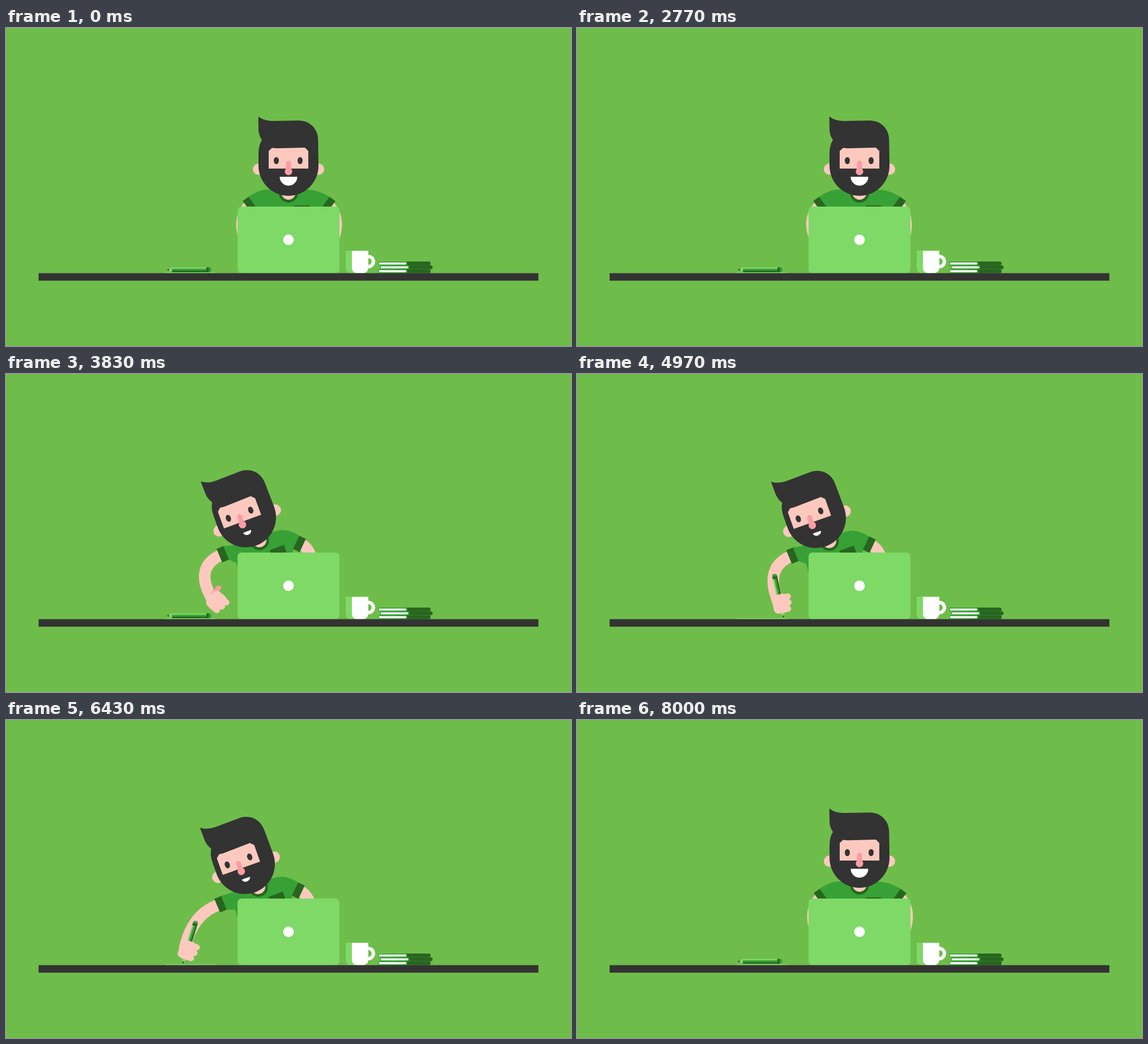
Recreate the animation shown at these times as an HTML page with a canvas. Size 998x561 px, loop 8330 ms.

```html
<!DOCTYPE html>
<html lang="en">
<head>
<meta charset="utf-8">
<title>Desk work</title>
<style>
html, body { margin: 0; width: 100%; height: 100%; overflow: hidden; background: #6ebd4a; }
canvas { display: block; }
</style>
</head>
<body>
<canvas id="stage" width="998" height="561"></canvas>
<script>
const ctx = document.getElementById('stage').getContext('2d');
const LOOP = 8330, MOVE_END = 8000;
const C = {
  bg: '#6ebd4a', dark: '#333333', skin: '#fdc9be', pink: '#fb9ca4',
  shirt: '#37a136', deep: '#27661f', light: '#7ed966', white: '#ffffff'
};
const RAD = Math.PI / 180;

const lerp = (a, b, k) => a + (b - a) * k;
const mix = (a, b, k) => a.map((v, i) => lerp(v, b[i], k));
const clamp = v => Math.max(0, Math.min(1, v));
function ease(t, from, to) {
  const u = clamp((t - from) / (to - from));
  return u < 0.5 ? 4 * u ** 3 : 1 - 4 * (1 - u) ** 3;
}
// Stage point of (dx, dy) in the frame of a joint [x, y, angle].
function at([x, y, deg], dx, dy) {
  const c = Math.cos(deg * RAD), s = Math.sin(deg * RAD);
  return [x + dx * c - dy * s, y + dx * s + dy * c];
}

function fill(color, draw) {
  ctx.fillStyle = color;
  ctx.beginPath();
  draw();
  ctx.fill();
}
const rect = (color, x, y, w, h, r = 0) => fill(color, () => ctx.roundRect(x, y, w, h, r));
const oval = (color, x, y, rx, ry = rx) => fill(color, () => ctx.ellipse(x, y, rx, ry, 0, 0, 7));
const poly = (color, ...p) => fill(color, () => {
  for (let i = 0; i < p.length; i += 2) ctx.lineTo(p[i], p[i + 1]);
});
function group([x, y, deg], draw) {
  ctx.save();
  ctx.translate(x, y);
  ctx.rotate(deg * RAD);
  draw();
  ctx.restore();
}
function limb(shoulder, elbow, wrist) {
  ctx.strokeStyle = C.skin;
  ctx.lineWidth = 20.5;
  ctx.beginPath();
  ctx.moveTo(shoulder[0], shoulder[1]);
  ctx.quadraticCurveTo(...elbow, ...wrist);
  ctx.stroke();
}

// Each joint goes from the typing pose to the leaning pose.
const NECK = [[499, 292, 0], [446, 296, -20]];
const HEAD = [[499, 249, 0], [424, 259.7, -19.6]];
const CUFF_L = [[431, 312, -36], [380.5, 320.5, -22.6]];
const CUFF_R = [[569, 312, 36], [516.3, 301, 25]];
const ELBOW_L = [[404.5, 341], [329, 340]];
const ELBOW_R = [[595.5, 341], [535.5, 304.5]];
const WRIST_R = [[572, 385], [545, 350]];
const KEYS = [434, 388, 40], REACH = [372, 403, 40];
const FLAT = [284, 426.5, 90];
const CUFF_W = 13, CUFF_H = 26;

const PICK = 4167, WRITE = 4900, STOP = 6600, DROP = 7000;

// Pencil tip and tilt while it scribbles across the paper.
function writing(t) {
  const k = t - 4970;
  const x = 365 - 0.0363 * k + 4 * Math.sin(2 * Math.PI * k / 365);
  return [x, 430, -12.2 + (365 - x) * 0.56];
}

function pencilPose(t) {
  if (t < PICK) return FLAT;
  if (t < WRITE) {
    const u = ease(t, PICK, WRITE), p = mix(FLAT, writing(WRITE), u);
    p[1] -= 14 * Math.sin(Math.PI * u);
    return p;
  }
  if (t < STOP) return writing(t);
  return mix(writing(STOP), [283.6, 425.8, 90], ease(t, STOP, DROP));
}

// Hand joint while it holds the pencil.
function grip(pencil) {
  const flat = clamp((pencil[2] - 18) / 72), [x, y] = at(pencil, 2, -24);
  return [x, y - 16 * flat, pencil[2] - 51 * flat];
}

function handPose(t, w) {
  if (t < 3830) return mix(KEYS, REACH, w);
  if (t < PICK) return mix(REACH, grip(FLAT), ease(t, 3830, PICK));
  if (t < DROP) return grip(pencilPose(t));
  return mix(KEYS, grip(pencilPose(DROP)), w);
}

function drawPencil(pose) {
  group(pose, () => {
    rect(C.shirt, -4.3, -79, 8.6, 9, [4, 4, 0, 0]);
    rect(C.deep, -4.3, -74.5, 8.6, 4.5);
    rect(C.light, -4.3, -70, 2.6, 61);
    rect(C.shirt, -1.8, -70, 3.4, 61);
    rect(C.deep, 1.5, -70, 2.8, 61);
    poly(C.light, -4.3, -9.2, 4.3, -9.2, 0, 0);
    poly(C.dark, -1.8, -3.8, 1.8, -3.8, 0, 0);
  });
}

function drawHand(pose, open) {
  group(pose, () => {
    if (open > 0) rect(C.pink, -18.2, -8 - 18.5 * open, 9, 22, 4.5);
    rect(C.skin, -16, -18, 28, 33, 8);
    for (let i = 0; i < 3; i++) rect(C.skin, -8, -16.5 + i * 10.5, 26.5 - i * i, 11, 5.5);
  });
}

function drawHead(pose, w, blink) {
  group(pose, () => {
    ctx.translate(-499, -249);
    oval(C.skin, 446, 249, 10);
    oval(C.skin, 552, 249, 10);
    fill(C.dark, () => {
      ctx.moveTo(445.7, 156);
      ctx.quadraticCurveTo(456, 164.3, 472, 164);
      ctx.lineTo(517, 163.3);
      ctx.bezierCurveTo(537, 163.3, 551.3, 178, 551.3, 198);
      ctx.lineTo(552, 243);
      ctx.arc(499, 243, 53, 0, Math.PI);
      ctx.lineTo(446, 222);
      ctx.quadraticCurveTo(446, 207, 452, 197.5);
      ctx.quadraticCurveTo(446, 189, 446, 178);
    });
    // The face slides sideways as the head turns.
    ctx.translate(-8.3 * w, 0);
    poly(C.skin, 464, 217, 470, 211.5, 478, 212.3, 528, 211, 534, 217, 534, 248, 464, 248);
    for (const x of [477.5, 519.5]) oval(C.dark, x, 234, 4.5, 6.2 * blink);
    fill(C.white, () => ctx.ellipse(499 + 1.5 * w, lerp(262.5, 267, w),
      lerp(15.5, 7.5, w), lerp(15.7, 6.3, w), 0, 0, Math.PI));
    ctx.translate(-2 * w, 0);
    rect(C.pink, 494.7, 234, 8.6, 22, 4.3);
    oval(C.pink, 499, 253, 6.6);
  });
}

function drawCuff(joint) {
  group(joint, () => rect(C.deep, -CUFF_W / 2, -CUFF_H / 2, CUFF_W, CUFF_H));
}

function drawShirt(neck, cuffL, cuffR) {
  const inner = (cuff, side, end) => at(cuff, side * CUFF_W / 2, end * CUFF_H / 2);
  fill(C.shirt, () => {
    ctx.moveTo(...inner(cuffL, 1, -1));
    ctx.quadraticCurveTo(...at(neck, -50, -9), ...at(neck, -31, -7));
    ctx.lineTo(...at(neck, 31, -7));
    ctx.quadraticCurveTo(...at(neck, 52, -7), ...inner(cuffR, -1, -1));
    ctx.lineTo(...inner(cuffR, -1, 1));
    ctx.lineTo(...at(neck, 40, 60));
    ctx.lineTo(...at(neck, -53, 37));
    ctx.lineTo(...at(neck, -52, 22));
    ctx.lineTo(...inner(cuffL, 1, 1));
  });
  group(neck, () => {
    rect(C.deep, 11, 21, 27, 20);
    oval(C.deep, 0, -1, 17);
    oval(C.skin, 0, -1.5, 12.5);
  });
}

function drawMug() {
  rect(C.light, 600, 393, 30, 39.5, [0, 0, 9, 9]);
  rect(C.white, 611, 393, 29, 39.5, [0, 0, 9, 9]);
  ctx.strokeStyle = C.white;
  ctx.lineWidth = 6;
  ctx.beginPath();
  ctx.arc(640, 412, 9, -Math.PI / 2, Math.PI / 2);
  ctx.stroke();
}

function drawBooks() {
  for (let i = 0; i < 3; i++) {
    const dx = i % 2 * 3.5, y = 412 + i * 6.8;
    rect(C.deep, 690 + dx, y, 60, 6.8, [0, 3, 3, 0]);
    rect(C.shirt, 658 + dx, y, 51, 6.8, [0, 3.4, 3.4, 0]);
    rect(C.white, 659 + dx, y + 1.7, 48, 3.5, [0, 1.7, 1.7, 0]);
  }
}

function draw(t) {
  const start = ease(t, 3133, 3830);
  const body = start - ease(t, 7067, 7833);
  const head = start - ease(t, 7067, 7700);
  const arm = start - ease(t, 7167, 8000);
  const settle = start * (1 - ease(t, 3830, 4230));
  const tap = -1.25 * (1 - Math.cos(6 * Math.PI * t / 1000)) * (1 - arm);
  const blink = Math.min(...[467, 2133, 4600].map(b => Math.max(0.1, clamp(Math.abs(t - b) / 120))));

  // Pose between two ends, moved by (dx, dy), with the settling after the lean.
  const pose = ([from, to], w, dx = 0, dy = 0) => {
    const [x, y, ...angle] = mix(from, to, w);
    return [x + dx + 2 * settle, y + dy - 1.3 * settle, ...angle];
  };
  const hand = handPose(t, arm);
  const swing = (361 - hand[0]) / 40 * arm;
  const cuffL = pose(CUFF_L, body, tap / 2 - 1.5 * swing, 4.5 * swing);
  const cuffR = pose(CUFF_R, body, tap / 2);
  const skull = pose(HEAD, head);
  skull[2] -= 0.6 * settle;

  rect(C.bg, 0, 0, 998, 561);
  limb(cuffR, pose(ELBOW_R, arm, 2 * tap), pose(WRIST_R, arm));
  drawShirt(pose(NECK, body), cuffL, cuffR);
  drawCuff(cuffR);
  drawHead(skull, head, blink);
  limb(cuffL, mix(ELBOW_L[0], ELBOW_L[1], arm).map((v, i) => i ? v : v + 2 * tap), [hand[0] - 6, hand[1] - 3]);
  drawCuff(cuffL);

  rect(C.light, 282, 430.8, 88, 1.8);
  drawPencil(pencilPose(t));
  drawHand(hand, t < DROP ? 1 - ease(t, 3950, PICK) : ease(t, DROP, 7200));

  rect(C.light, 409, 315, 180, 117.5, 7);
  oval(C.white, 499, 373.7, 9.4);
  drawMug();
  drawBooks();
  rect(C.dark, 57.6, 432.5, 882.8, 13.2);
}

function tick() {
  draw(Math.min(performance.now() % LOOP, MOVE_END));
  requestAnimationFrame(tick);
}
tick();
</script>
</body>
</html>
```
